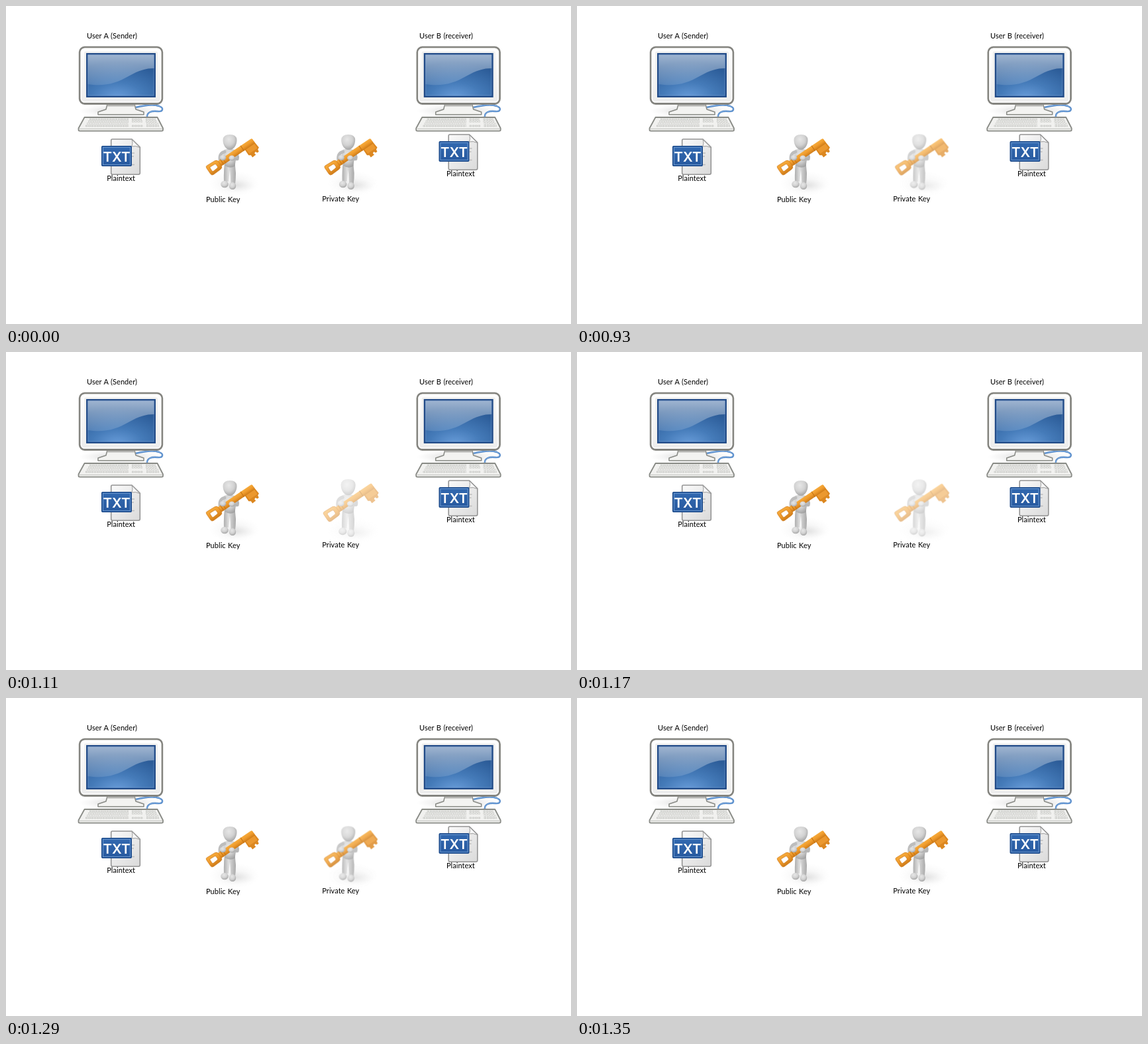
Recreate the animation shown at these times as an HTML page. Size 853 px wide and 480 px high, loop 1880 ms.

```html
<!DOCTYPE html>
<html lang="en">
<head>
<meta charset="utf-8">
<title>Public and private key</title>
<style>
  html, body { margin: 0; width: 100%; height: 100%; overflow: hidden; background: #fff; }
  svg { display: block; width: 853px; height: 480px; }
  .label { font: 11px Lato, "Open Sans", sans-serif; letter-spacing: .05px; word-spacing: .6px; fill: #000; }
  .badge { font: 600 20.5px Inter, "Liberation Sans", sans-serif; fill: #fff; }
  .flash { transform-origin: 518px 236px; animation: flash 1880ms step-end infinite; }
  @keyframes flash {
    0%       { opacity: 1;   transform: none; }
    49.468%  { opacity: .68; transform: scale(1.014); }
    52.660%  { opacity: .5;  transform: scale(1.026); }
    55.851%  { opacity: .5;  transform: scale(1.038); }
    59.043%  { opacity: .5;  transform: scale(1.049); }
    62.234%  { opacity: .5;  transform: scale(1.039); }
    65.426%  { opacity: .56; transform: scale(1.027); }
    68.617%  { opacity: .82; transform: scale(1.014); }
    71.809%, 100% { opacity: 1; transform: none; }
  }
</style>
</head>
<body>
<svg viewBox="0 0 853 480">
  <defs>
    <radialGradient id="screen" cx=".45" cy="1.05" r=".85">
      <stop offset="0" stop-color="#6a9edb"/><stop offset=".45" stop-color="#457bb9"/><stop offset="1" stop-color="#2b5b97"/>
    </radialGradient>
    <linearGradient id="gloss" x2="0" y2="1">
      <stop offset="0" stop-color="#fff" stop-opacity=".55"/><stop offset="1" stop-color="#fff" stop-opacity=".12"/>
    </linearGradient>
    <linearGradient id="casing" x2="0" y2="1">
      <stop offset="0" stop-color="#fff"/><stop offset="1" stop-color="#ececec"/>
    </linearGradient>
    <linearGradient id="page" x2="1" y2="1">
      <stop offset="0" stop-color="#fafafa"/><stop offset="1" stop-color="#dadada"/>
    </linearGradient>
    <linearGradient id="blue" x2="0" y2="1">
      <stop offset="0" stop-color="#3269b0"/><stop offset="1" stop-color="#27599f"/>
    </linearGradient>
    <radialGradient id="skin" cx=".42" cy=".32" r=".7">
      <stop offset="0" stop-color="#e6e6e6"/><stop offset=".55" stop-color="#d2d2d2"/><stop offset="1" stop-color="#a2a2a2"/>
    </radialGradient>
    <linearGradient id="limb">
      <stop offset="0" stop-color="#aeaeae"/><stop offset=".4" stop-color="#dedede"/><stop offset="1" stop-color="#a9a9a9"/>
    </linearGradient>
    <linearGradient id="gold" x2="0" y2="1">
      <stop offset="0" stop-color="#f6ab3c"/><stop offset=".5" stop-color="#ee9a2c"/><stop offset="1" stop-color="#ce7b18"/>
    </linearGradient>
    <radialGradient id="shade">
      <stop offset="0" stop-color="#999" stop-opacity=".45"/><stop offset="1" stop-color="#bbb" stop-opacity="0"/>
    </radialGradient>

    <g id="computer">
      <ellipse cx="172" cy="158" rx="62" ry="10" fill="url(#shade)"/>
      <path id="cable" d="M196 153C208 150 222 148 231 151C239 154 237 160 229 159C220 158 213 160 213 167" fill="none" stroke="#3f78bd" stroke-width="2.4"/>
      <path d="M196 153C208 150 222 148 231 151C239 154 237 160 229 159C220 158 213 160 213 167" fill="none" stroke="#8db9ea" stroke-width="1"/>
      <path d="M153 148H194L196 156 208 160V164H139V160L151 156Z" fill="#f3f3f1" stroke="#888a85" stroke-width="1.5" stroke-linejoin="round"/>
      <path d="M153 149H194L194.5 151.5H152.5Z" fill="#b3b3b0"/>
      <rect x="111.2" y="62.2" width="124.6" height="85.3" rx="7.5" fill="url(#casing)" stroke="#858580" stroke-width="2.8"/>
      <rect x="113.4" y="64.4" width="120.2" height="80.9" rx="5.5" fill="none" stroke="#fff" stroke-width="1.5"/>
      <rect x="118" y="68.5" width="111" height="71.5" rx="2" fill="#f0f0ef"/>
      <rect x="122.2" y="72.2" width="102.6" height="64.6" fill="url(#screen)"/>
      <path d="M123 118C151 122 167 116 185 106C201 97 211 94 224 94V73H123Z" fill="url(#gloss)"/>
      <rect x="122.2" y="72.2" width="102.6" height="64.6" fill="none" stroke="#204a87" stroke-width="2.3"/>
      <rect x="124" y="74" width="99" height="61" fill="none" stroke="#7da2d4" stroke-opacity=".4"/>
      <path d="M118.5 168H228.5L237 184.5V187Q237 188.6 235 188.6H111.5Q109.5 188.6 109.5 187V184.5Z" fill="#f1f1ef" stroke="#888a85" stroke-width="1.8" stroke-linejoin="round"/>
      <path d="M111 185.5H236" stroke="#c2c3bf" stroke-width="1"/>
      <g fill="none" stroke="#b9bab6" stroke-width="2.4" stroke-dasharray="3.3 1">
        <path d="M126 171H185M124 174.3H185M122 177.6H185M120 181H185"/>
        <path d="M190 171H205M190 174.3H206M190 181H207M211 171H226M211 174.3H228M212 177.6H230M212 181H231"/>
      </g>
      <g fill="none" stroke="#fafaf9" stroke-width="1.2" stroke-dasharray="2.3 2">
        <path d="M126.5 171H185M124.5 174.3H185M122.5 177.6H185M120.5 181H185"/>
        <path d="M190.5 171H205M190.5 174.3H206M190.5 181H207M211.5 171H226M211.5 174.3H228M212.5 177.6H230M212.5 181H231"/>
      </g>
    </g>

    <g id="file">
      <path d="M160.5 201H190L202.3 213V252Q202.3 254.2 200 254.2H160.5Q158.7 254.2 158.7 252V203Q158.7 201 160.5 201Z" fill="url(#page)" stroke="#949494" stroke-width="1.6"/>
      <path d="M190 201.5Q192 208 189.5 212Q196 210.5 202 213.5Z" fill="#f7f7f7" stroke="#9a9a9a" stroke-width="1"/>
      <path d="M190 222H194M190 227H193M190 239.5H194" stroke="#bcbcbc" stroke-width="1.3"/>
      <rect x="144.8" y="211.8" width="44.4" height="29.4" rx="1" fill="url(#blue)" stroke="#1d4b8b" stroke-width="1.6"/>
      <rect x="146.4" y="213.4" width="41.2" height="26.2" fill="none" stroke="#6b98d0" stroke-width="1"/>
      <text class="badge" x="167" y="234.5" text-anchor="middle">TXT</text>
    </g>

    <g id="keeper">
      <ellipse cx="345" cy="268" rx="38" ry="19" fill="url(#shade)" opacity=".36"/>
      <ellipse cx="350" cy="271" rx="26" ry="10" fill="url(#shade)" opacity=".4"/>
      <path d="M330 236Q337 232 345.5 236L347 252Q347 262 346 269H339.5L338 247 336 265H329Q328.5 249 330 236Z" fill="url(#limb)"/>
      <ellipse cx="330" cy="269" rx="5.8" ry="5.3" fill="url(#skin)"/>
      <ellipse cx="342" cy="271.5" rx="5.2" ry="5.5" fill="url(#skin)"/>
      <path d="M329.5 217Q337 214 345 217Q349 220 347.5 228L345.5 242Q338 246 330.5 241L328 225Z" fill="url(#skin)"/>
      <path d="M330 220Q322 222 323 232" fill="none" stroke="#bdbdbd" stroke-width="4.8" stroke-linecap="round"/>
      <path d="M345.5 220Q351 225 349.5 231L343 231" fill="none" stroke="#b6b6b6" stroke-width="4.4" stroke-linecap="round" stroke-linejoin="round"/>
      <path d="M327.5 202Q328 194 338 194Q348 194 348.5 202C348.5 210 344 217 338 217S327.5 210 327.5 202Z" fill="url(#skin)"/>
      <g transform="translate(314.5 243.3) rotate(-34)">
        <path d="M53 1H71.5L72.5 13 69.5 14.5 69 18 66 18.3 64.5 15.5 62 16.5 62.5 19.5 56 20 56 16 53 14Z" fill="#dc8720"/>
        <path d="M54.5 3H70V12.5H55.5Z" fill="#eb982f"/>
        <rect x="8" y="-4.6" width="63.5" height="9.2" rx="2.2" fill="url(#gold)"/>
        <path d="M14 -4.8V4.8M18 -4.8V4.8M51 -4.8V4.8" stroke="#c97716" stroke-width="1.2"/>
        <path d="M-8 -8.2L6 -7.6Q10 -7 10 -3V4Q10 7.6 6 8L-7 8.6Q-10.5 8.6 -10.5 5V-5Q-10.5 -8.2 -8 -8.2ZM-4.5 -3.8Q-6 -3.8 -6 -2V2.5Q-6 4.2 -4.5 4.2L2.5 3.6Q4.5 3.4 4.5 1.8V-1.6Q4.5 -3.2 2.5 -3.4Z" fill="url(#gold)" fill-rule="evenodd" stroke="#c97314" stroke-width=".6"/>
      </g>
      <ellipse cx="327.5" cy="229" rx="4.8" ry="4.2" fill="url(#skin)"/>
      <ellipse cx="341" cy="229.5" rx="4.6" ry="4" fill="url(#skin)"/>
    </g>
  </defs>

  <use href="#computer"/>
  <use href="#computer" x="509.7"/>
  <use href="#file"/>
  <use href="#file" x="509.5" y="-7"/>
  <use href="#keeper"/>
  <g class="flash"><use href="#keeper" x="178.7"/></g>

  <g class="label">
    <text x="122" y="49">User A (Sender)</text>
    <text x="624" y="49">User B (receiver)</text>
    <text x="152.2" y="264">Plaintext</text>
    <text x="665" y="257">Plaintext</text>
    <text x="302" y="296">Public Key</text>
    <text x="477.3" y="295">Private Key</text>
  </g>
</svg>
</body>
</html>
```
